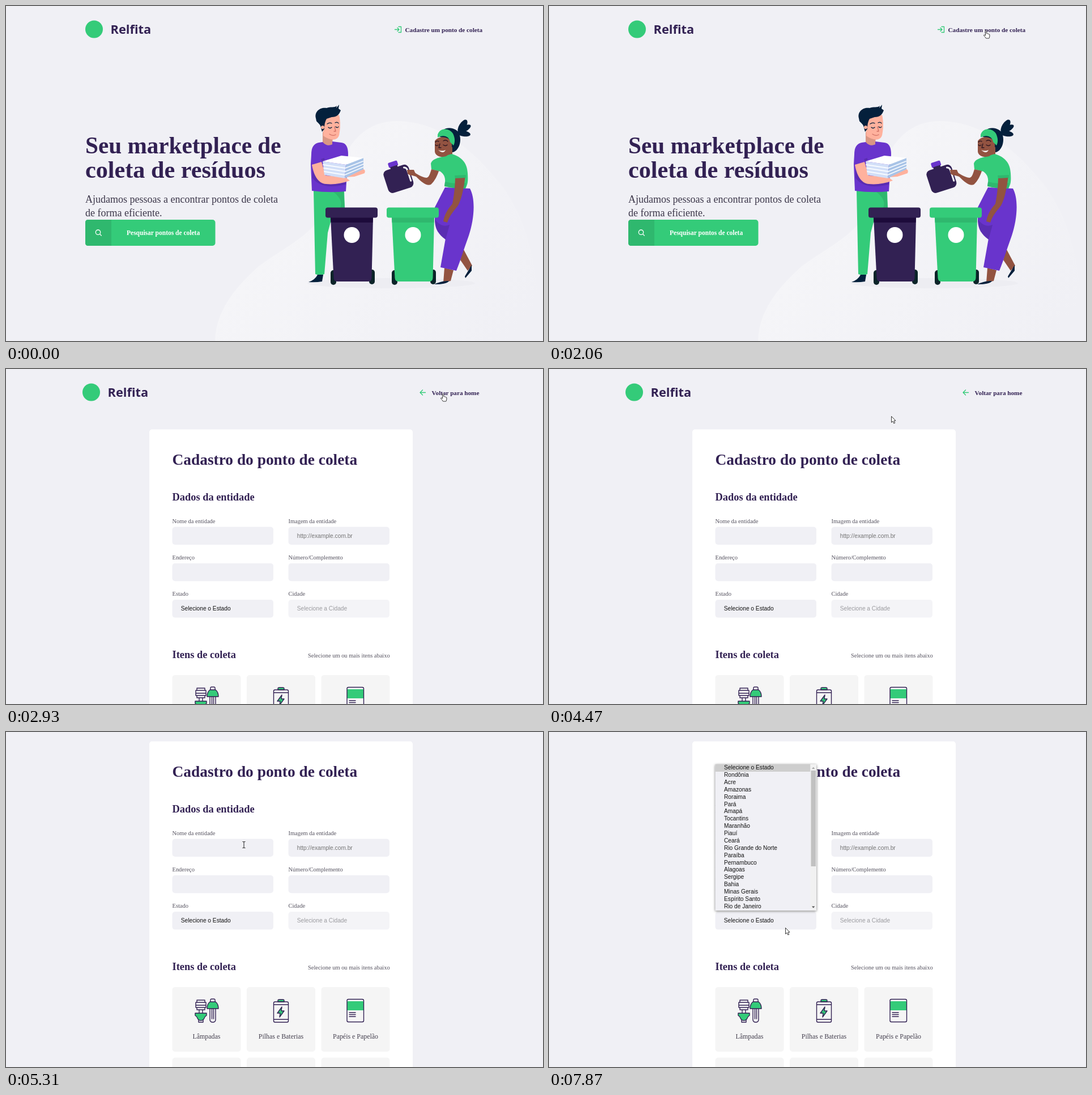
Recreate the animation shown at these times as an HTML page. Size 948 by 591 pixels, loop 8000 ms.

```html
<!DOCTYPE html>
<html lang="pt-BR">
<head>
<meta charset="utf-8">
<title>Coleta de resíduos</title>
<style>
  html, body { margin: 0; width: 100%; height: 100%; overflow: hidden; background: #f0f0f5; }
  svg { display: block; width: 100vw; height: 100vh; }
  text { font-family: "Liberation Serif", serif; fill: #322153; }
  .brand { font: bold 21.8px "Noto Sans", sans-serif; }
  .link { font-size: 11.2px; font-weight: bold; }
  .hero { font-size: 41.2px; font-weight: bold; }
  .hero.wide { font-size: 42.2px; }
  .lead { font-size: 18px; fill: #3c374a; }
  .h1 { font-size: 27.4px; font-weight: bold; }
  .h2 { font-size: 18.4px; font-weight: bold; }
  .label { font-size: 10.45px; fill: #55525f; }
  .item { font-size: 11.9px; fill: #45404f; text-anchor: middle; }
  .field { font: 10.2px "Liberation Sans", sans-serif; fill: #111; }
  .line { fill: none; stroke-width: 1.3; stroke-linecap: round; stroke-linejoin: round; }
  .icon { fill: none; stroke: #322153; stroke-width: 1.4; stroke-linejoin: round; stroke-linecap: round; }
  .g { fill: #34cb79; } .dg { fill: #2fb86e; }
  .p { fill: #6934cc; } .dp { fill: #5a2db2; }
  .n { fill: #322153; } .k { fill: #04203c; }
  .pink { fill: #ffb19d; } .brown { fill: #925341; }
  #menu rect.box { filter: drop-shadow(0 1px 2px #0008); }
</style>
</head>
<body>
<svg viewBox="0 0 948 591" preserveAspectRatio="none">
  <defs>
    <linearGradient id="glow" gradientUnits="userSpaceOnUse" x1="530" y1="330" x2="870" y2="610">
      <stop offset="0" stop-color="#f5f5f8"/><stop offset="1" stop-color="#f0f0f5"/>
    </linearGradient>
    <g id="bin">
      <rect x="9" y="110" width="10" height="26" rx="5" fill="#0b2429"/>
      <rect x="77" y="109" width="10" height="26" rx="5" fill="#0b2429"/>
      <path d="M9 17H84L81.500 124Q81 130 75 130H21Q15 130 14.500 124Z"/>
    </g>
  </defs>

  <g id="home">
    <path fill="url(#glow)" d="M369 591C370 545 395 505 445 460C490 425 545 405 568 350C585 285 608 203 690 203C765 203 825 255 868 308C925 375 942 475 944 591Z"/>
    <ellipse cx="680" cy="489" rx="148" ry="9" fill="#ededf2"/>
    <circle class="g" cx="155.500" cy="41" r="15.500"/>
    <text class="brand" x="184.500" y="49">Relfita</text>
    <path class="line" stroke="#34cb79" d="M693 36.500h4.500v10H693M686.500 41.500h7.500M691 38.500l3 3-3 3"/>
    <text class="link" x="704.500" y="46">Cadastre um ponto de coleta</text>
    <text class="hero" x="140" y="260">Seu marketplace de</text>
    <text class="hero wide" x="140" y="303">coleta de resíduos</text>
    <text class="lead" x="140" y="347">Ajudamos pessoas a encontrar pontos de coleta</text>
    <text class="lead" x="140" y="371">de forma eficiente.</text>
    <rect class="g" x="140" y="377" width="229.500" height="46" rx="5"/>
    <path class="dg" d="M186 377H145q-5 0-5 5v36q0 5 5 5h41Z"/>
    <g class="line" stroke="#fff"><circle cx="162.500" cy="399.200" r="4.200"/><path d="M165.700 402.400l2.600 2.600"/></g>
    <text class="link" x="213" y="403.500" style="fill:#fff;font-size:11.5px">Pesquisar pontos de coleta</text>

    <g id="man">
      <path class="g" d="M543 325L597 326 598 360 576 370 568 400 562 473Q554 476 546 473Z"/>
      <path class="dg" d="M578 328L596 327 598 356 590 356Q596 342 578 328Z"/>
      <path class="k" d="M550 474H560L558 486Q547 488 534 487 546 483 550 474Z"/>
      <path fill="#d99684" d="M559 222L577 230 576 244 567 249 559 242Z"/>
      <path class="p" d="M552 241C543 243 539 250 539 262L538 279 540 326Q570 330 600 327L604 262C604 248 600 242 592 241L576 239 576 244Q567 249 559 240Z"/>
      <path class="dp" d="M541 288Q549 318 600 311L600 315Q556 325 541 303ZM556 270L562 268 563 284Z"/>
      <path class="pink" d="M560 198L588 192C591 205 590 218 588 228C585 238 573 238 560 229Z"/>
      <path class="k" d="M547 198C544 186 555 178 566 180C572 177 580 180 584 176L583 180 588 174 587 181 591 184C588 192 584 196 575 196L566 199Q562 205 562 217L558 222 556 215C555 208 551 207 548 203Z"/>
      <circle class="pink" cx="559" cy="214" r="3"/>
      <g class="line" stroke="#04203c" stroke-width="1"><path d="M567 208q4-3 8-1M581 206q4-2 6 1M569 214q3 3 6 0M582 213q3 3 5 0"/></g>
      <path class="line" stroke="#cf6f64" stroke-width="1" d="M580 213l2 8h-3M571 226q6 4 11 1"/>
      <path class="pink" d="M540 280L557 275 564 299 599 302 607 308Q585 316 565 314C550 313 543 297 540 280ZM600 302L628 287Q636 288 633 295L615 301Z"/>
      <path fill="#d2dff8" d="M559 274L600 280 598 304 562 298Z"/>
      <path fill="#a9c4e7" d="M600 280L631 268 631 288 598 304Z"/>
      <path fill="#fff" d="M559 274L592 264 631 268 600 280Z"/>
      <path class="line" stroke="#f8fbff" style="stroke-width:1.800" d="M560 280L599 286 630 274M561 286L599 292 631 279M562 292L598 298 631 284"/>
    </g>

    <g id="woman">
      <path class="brown" d="M807 428L823 458 815 467 802 448ZM774 462L790 466 785 485 772 488Z"/>
      <path class="k" d="M822 457L822 467 811 480 810 477ZM756 491Q768 485 782 485 779 491 756 491Z"/>
      <g class="k">
        <ellipse cx="806" cy="212" rx="13" ry="6" transform="rotate(-58 806 212)"/>
        <ellipse cx="809" cy="217" rx="13" ry="5" transform="rotate(-30 809 217)"/>
        <ellipse cx="808" cy="225" rx="12" ry="5" transform="rotate(8 808 225)"/>
        <path d="M764 230C768 214 785 212 795 219C805 226 803 245 797 252 794 257 788 259 785 258L780 236Z"/>
      </g>
      <path class="p" d="M775 320L819 322C829 340 827 375 817 405C808 430 802 450 795 467L767 461 776 410C760 398 755 385 757 355Z"/>
      <path class="dp" d="M757 376Q768 392 783 386L776 412C762 402 757 392 757 376Z"/>
      <path class="brown" d="M775 250L788 249 788 264 775 270Z"/>
      <path class="g" d="M750 278C753 269 764 268 776 264L787 261C803 266 814 275 815 295C816 310 815 315 811 322 798 322 785 321 774 318 777 303 774 298 767 292L751 288Z"/>
      <path class="dg" d="M775 310Q792 315 812 312L811 322Q792 322 774 318Z"/>
      <path class="brown" d="M757 238C764 228 780 230 786 239C789 250 786 260 777 265 768 268 758 265 757 257Z"/>
      <path class="g" d="M762 227C767 213 783 216 789 225C793 233 793 241 790 246L784 240C783 230 772 226 762 232Z"/>
      <path class="line" stroke="#2b1620" stroke-width="1" d="M758 240q3-3 6-1M772 238q5-3 8 1M758 245q3 3 5 0M772 245q4 3 7 0M766 243l-2 7h4"/>
      <path fill="#fff" d="M763 254Q770 257 776 254 772 262 763 254Z"/>
      <path class="brown" d="M751 288C748 298 746 303 742 303 734 302 725 296 718 292L709 288 711 297 724 301C735 312 743 318 750 315 757 309 762 298 764 291Z"/>
      <path class="brown" d="M793 300L811 299C808 325 803 343 798 352 790 362 783 370 779 382L772 380C774 368 780 358 788 349 791 335 793 315 793 300Z"/>
      <path class="dg" d="M792 299L812 298 812 303 793 304Z"/>
    </g>
    <g transform="rotate(-18 692.5 304.5)">
      <rect class="p" x="683" y="273" width="17" height="9" rx="2"/>
      <rect class="n" x="685" y="281" width="13" height="6"/>
      <rect class="n" x="669.500" y="284" width="46.500" height="42" rx="8"/>
      <path class="line" style="stroke-width:3" stroke="#f4f4f7" d="M708 289Q712.500 290 712.500 296V315"/>
    </g>
    <path class="brown" d="M708 289L720 289 724 298 714 299 709 296Z"/>

    <use href="#bin" class="n" x="564" y="356"/>
    <path fill="#1d0b3b" d="M573 373H648L647.500 382H573.500Z"/>
    <rect class="n" x="564" y="355.500" width="92" height="18" rx="4"/>
    <use href="#bin" class="g" x="672" y="356"/>
    <path class="dg" d="M681 373H756L755.500 382H681.500Z"/>
    <rect class="g" x="672" y="355.500" width="92" height="18" rx="4"/>
    <circle cx="610.500" cy="404" r="14" fill="#fff"/><circle cx="718.500" cy="404" r="14" fill="#fff"/>
  </g>

  <g id="page">
    <circle class="g" cx="150.500" cy="41" r="15.500"/>
    <text class="brand" x="179.500" y="49">Relfita</text>
    <path class="line" stroke="#34cb79" d="M740.500 41.500h-9M735.500 37l-4.500 4.500 4.500 4.500"/>
    <text class="link" x="751.500" y="46">Voltar para home</text>
    <rect x="253" y="106.500" width="465" height="700" rx="5" fill="#fff"/>
    <text class="h1" x="293.500" y="168.500">Cadastro do ponto de coleta</text>
    <text class="h2" x="293.500" y="231.500">Dados da entidade</text>
    <g id="fields"></g>
    <text class="h2" x="293.500" y="509.500">Itens de coleta</text>
    <text class="label" x="533" y="508.500">Selecione um ou mais itens abaixo</text>
    <g id="cards"></g>
    <g class="icon">
      <path d="M337 563h14v4h-14zM335 567h18v5h-18zM335 572h18v4h-18zM337 576h14v4h-14zM341 580v6M347 580v6M340 598h8v4h-8z"/>
      <path class="g" d="M334 586h20v4q-3 2-4 5-2 4-6 4t-6-4q-1-3-4-5Z"/>
      <path d="M361 566v-3q0-2 2-2h4q2 0 2 2v3M360 578v19q0 5 5 5t5-5v-19M363.500 578v18M366.500 578v18"/>
      <path class="g" d="M360 566h10q5 4 5 12h-20q0-8 5-12Z"/>
    </g>
    <g class="icon">
      <path class="g" d="M480 566v-2q0-2 2-2h7q2 0 2 2v2Z"/>
      <rect x="472.500" y="566" width="26" height="36" rx="2.500"/>
      <path d="M473 571h25M473 597h25"/>
      <path class="g" d="M487 575l-8 11h5l-1 7 8-11h-5Z"/>
    </g>
    <g class="icon">
      <path class="g" stroke="none" d="M602 565h29v16h-29Z"/>
      <rect x="602" y="561.500" width="29.500" height="40" rx="2.500"/>
      <path d="M606 585h11M606 588.500h11M606 592h11"/>
    </g>
  </g>

  <rect id="caret" x="308.500" width="1" height="11"/>

  <g id="menu">
    <rect class="box" x="293.500" y="57" width="178.500" height="258" fill="#f0f0f5"/>
    <rect x="293.500" y="57" width="168" height="13" fill="#cecece"/>
    <rect x="461.500" y="57" width="10.500" height="258" fill="#f1f1f1"/>
    <rect x="462.500" y="68" width="8.500" height="169" fill="#c1c1c1"/>
    <path d="M464 65l2.700-3 2.700 3Z" fill="#a3a3a3"/><path d="M464 307.500l2.700 3 2.700-3Z" fill="#505050"/>
  </g>

  <g id="cursor" stroke="#222" stroke-linejoin="round">
    <path id="arrow" fill="#fff" stroke-width=".9" d="M.5.500V11.300L3 9l1.800 4 1.900-.8-1.700-4H8Z"/>
    <path id="hand" fill="#fff" stroke-width=".9" d="M2.500 1.500Q2.500.3 3.500.300T4.600 1.500V5.500Q6 5 6.500 6 8 5.500 8.300 6.700 9.900 6.500 9.900 8V10Q9.900 12 8.800 14H3.500Q2 11.500-.3 9.200-.8 8 .6 7.900L2.500 9Z"/>
    <path id="beam" fill="none" stroke-width="1" d="M-2.500-5.500H-1L0-5 1-5.500H2.500M0-5V5M-2.500 5.500H-1L0 5 1 5.500H2.500"/>
  </g>
</svg>

<script>
const $ = id => document.getElementById(id);
const show = (id, on) => { $(id).style.display = on ? '' : 'none'; };
const add = (id, markup) => $(id).insertAdjacentHTML('beforeend', markup);

const fields = [
  ['Nome da entidade', ''], ['Imagem da entidade', 'http://example.com.br', '#757575'],
  ['Endereço', ''], ['Número/Complemento', ''],
  ['Estado', 'Selecione o Estado', '#111'], ['Cidade', 'Selecione a Cidade', '#9b9b9f']
];
fields.forEach(([label, value, color], i) => {
  const x = 293.5 + i % 2 * 205, y = 278.5 + (i >> 1) * 64.3;
  add('fields', `<text class="label" x="${x}" y="${y - 7}">${label}</text>
    <rect x="${x}" y="${y}" width="178.500" height="31.500" rx="5" fill="${i === 5 ? '#f4f4f7' : '#f0f0f5'}"/>
    <text class="field" x="${x + 15.3}" y="${y + 19.3}" style="fill:${color}">${value}</text>`);
});

['Lâmpadas', 'Pilhas e Baterias', 'Papéis e Papelão', '', '', ''].forEach((name, i) => {
  const x = 293.5 + i % 3 * 131.5, y = i < 3 ? 540 : 664.5;
  add('cards', `<rect x="${x}" y="${y}" width="121" height="114" rx="5" fill="#f5f5f5"/>
    <text class="item" x="${x + 60.5}" y="${y + 91}">${name}</text>`);
});

('Selecione o Estado,Rondônia,Acre,Amazonas,Roraima,Pará,Amapá,Tocantins,Maranhão,Piauí,Ceará,' +
 'Rio Grande do Norte,Paraíba,Pernambuco,Alagoas,Sergipe,Bahia,Minas Gerais,Espírito Santo,Rio de Janeiro')
  .split(',').forEach((name, i) =>
    add('menu', `<text class="field" x="309" y="${66.2 + i * 12.87}">${name}</text>`));

// Cursor stops: time, x, y
const stops = [
  [220, 788, 534], [990, 450, 188], [1100, 450, 188], [1910, 766, 44], [1980, 766, 44], [2060, 768, 43],
  [3260, 768, 43], [4010, 597, 100], [4110, 597, 100], [4470, 604, 83], [4700, 604, 83], [4930, 539, 109],
  [5310, 420, 199], [5400, 417, 203], [5660, 417, 203], [6170, 565, 207], [6280, 562, 206],
  [6780, 411, 279], [6850, 411, 279], [7090, 535, 283], [7170, 535, 283], [7700, 417, 345], [8000, 417, 345]
];
const ease = u => u * u * (3 - 2 * u);
const clamp = u => Math.max(0, Math.min(1, u));

function cursorAt(t) {
  const i = Math.max(1, stops.findIndex(s => s[0] > t));
  const [t0, x0, y0] = stops[i - 1], [t1, x1, y1] = stops[i];
  const u = ease(clamp((t - t0) / (t1 - t0)));
  return [x0 + (x1 - x0) * u, y0 + (y1 - y0) * u];
}

function cursorKind(t, x, y) {
  const onLink = y < 50 && x > (t < 2930 ? 686 : 730);
  if (onLink) return 'hand';
  const inColumn = (x > 293 && x < 472) || (x > 498 && x < 677);
  const inRow = (y > 188 && y < 220) || (y > 253 && y < 285);
  return t > 4930 && inColumn && inRow ? 'beam' : 'arrow';
}

function draw(now) {
  const t = now % 8000;
  show('home', t < 2930);
  show('page', t >= 2930);
  $('page').setAttribute('transform', `translate(0 ${-90 * ease(clamp((t - 4540) / 320))})`);

  const [x, y] = cursorAt(t), kind = cursorKind(t, x, y);
  show('cursor', t >= 290);
  $('cursor').setAttribute('transform', `translate(${x} ${y})`);
  for (const name of ['arrow', 'hand', 'beam']) show(name, name === kind);

  const focus = t < 6720 ? 5390 : 6720;
  show('caret', t >= focus && t < 7700 && (t - focus) % 1000 < 500);
  $('caret').setAttribute('y', focus === 5390 ? 199 : 263.5);
  show('menu', t >= 7780);
  requestAnimationFrame(draw);
}
requestAnimationFrame(draw);
</script>
</body>
</html>
```
